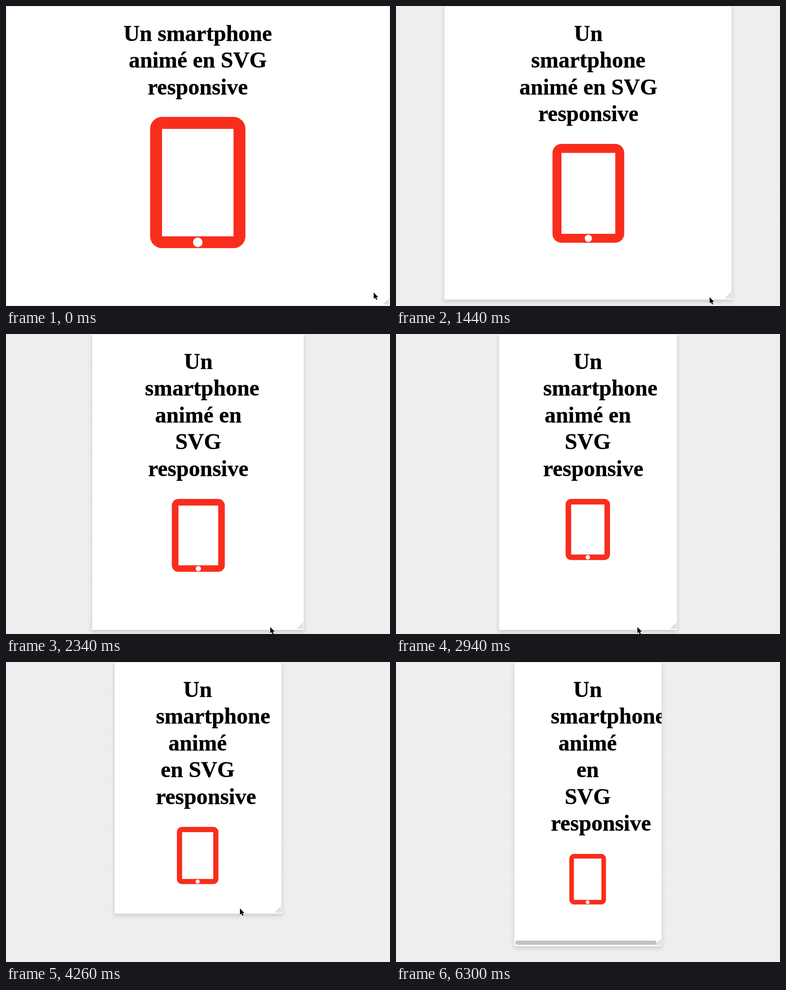
Write an HTML page that moves like this. It is 824 px wide and 644 px high and loops after 6360 ms.

```html
<!DOCTYPE html>
<html lang="fr">
<head>
<meta charset="utf-8">
<title>Un smartphone animé en SVG responsive</title>
<style>
html, body { margin: 0; width: 100%; height: 100%; overflow: hidden; background: #eee; }
svg { display: block; }
text { font: bold 48px "Liberation Serif", Times, serif; stroke: #000; stroke-width: .4px; }
#panel { filter: drop-shadow(0 4px 4px rgba(0, 0, 0, .13)); }
</style>
</head>
<body>
<svg width="824" height="644" viewBox="0 0 824 644">
  <defs>
    <pattern id="stripes" width="4" height="4" patternUnits="userSpaceOnUse">
      <rect width="4" height="4" fill="#efefef"/>
      <rect width="4" height="2" fill="#ededed"/>
    </pattern>
    <clipPath id="inside"><rect id="clip"/></clipPath>
  </defs>
  <rect width="824" height="644" fill="url(#stripes)"/>
  <rect id="panel" y=".5" fill="#fff" stroke="#dcdcdc"/>
  <g clip-path="url(#inside)">
    <g id="title"></g>
    <g id="phone">
      <rect width="100" height="137.8" rx="12.5" fill="#f92d1c"/>
      <rect x="12.5" y="12.6" width="75" height="112.8" fill="#fff"/>
      <circle cx="50" cy="131.7" r="5" fill="#fff"/>
    </g>
    <rect id="thumb" height="9" rx="4.5" fill="#c1c1c1"/>
  </g>
  <path id="grip" d="M-13 -2L-1 -14M-9 -2L-1 -10M-5 -2L-1 -6" stroke="#8a8a8a" fill="none"/>
  <path id="arrow" d="M0 0V13.6L3 10.8L5.2 15.8L7.5 14.8L5.4 10H9.6Z" stroke="#fff" stroke-linejoin="round" paint-order="stroke"/>
  <path id="sizer" d="M-7 -1H-1V-4H-3.5L0 -8L3.5 -4H1V-1H7V1H1V4H3.5L0 8L-3.5 4H-1V1H-7Z" stroke="#fff" stroke-width="2" stroke-linejoin="round" paint-order="stroke"/>
</svg>
<script>
const LOOP = 6360, STEP = 60, FULL = 823, LAG = 10;
const WORDS = "Un smartphone animé en SVG responsive".split(" ");

const $ = id => document.getElementById(id);
const set = (el, attrs) => { for (const k in attrs) el.setAttribute(k, attrs[k]); };
const move = (id, x, y) => set($(id), { transform: `translate(${x} ${y})` });
const show = (id, on) => set($(id), { visibility: on ? "visible" : "hidden" });
const clamp = (v, lo, hi) => Math.min(hi, Math.max(lo, v));

// smooth 0 to 1 between two times
function ramp(t, from, to) {
  const u = clamp((t - from) / (to - from), 0, 1);
  return u * u * (3 - 2 * u);
}

// distance of each side from the stage edge: a slowing drag, then a last nudge
function inset(t) {
  const s = clamp((t - 600) / 1000, 0, 2.6);
  return 138.2 * s - 18.8 * s * s + 21 * ramp(t, 4360, 4940);
}

function floorY(t) {
  return 643 - 18 * ramp(t, 700, 1860) + 10 * ramp(t, 1860, 2340)
    - 124 * ramp(t, 3100, 3720) + 99 * ramp(t, 3900, 4900);
}

// the pointer trails the corner, apart from its arrival and one last excursion
function pointer(t) {
  const side = inset(t);
  const arrive = 1 - ramp(t, 0, 240);
  const away = ramp(t, 5280, 5580) - ramp(t, 5760, 5880);
  return [
    FULL - 14 - 1.32 * side - 20 * arrive + 147 * away,
    floorY(t - 40) - 6 - 22 * arrive - 66 * away
  ].map(Math.round);
}

const pen = document.createElement("canvas").getContext("2d");
pen.font = 'bold 48px "Liberation Serif", Times, serif';
const measure = s => pen.measureText(s).width;

const rows = WORDS.map((_, i) => {
  const row = document.createElementNS("http://www.w3.org/2000/svg", "text");
  set(row, { y: Math.round(75 + i * 57.4) });
  return $("title").appendChild(row);
});

function wrap(width) {
  const lines = [WORDS[0]];
  for (const word of WORDS.slice(1)) {
    const last = lines.length - 1;
    const joined = lines[last] + " " + word;
    if (measure(joined) <= width) lines[last] = joined;
    else lines.push(word);
  }
  return lines;
}

function draw(time) {
  const t = Math.floor(time % LOOP / STEP) * STEP;
  const left = Math.round(inset(t)), width = FULL - 2 * left;
  const right = left + width, bottom = Math.round(floorY(t));

  set($("panel"), { x: left + .5, width, height: bottom });
  set($("clip"), { x: left + 1, y: 1, width: width - 1, height: bottom - 1 });

  // the page is laid out slightly behind its frame
  const page = FULL - 2 * inset(t - LAG);
  const box = page / 2, boxX = left + page / 4;
  const lines = wrap(box);
  rows.forEach((row, i) => {
    const s = lines[i] || "";
    row.textContent = s;
    set(row, { x: boxX + Math.max(0, (box - measure(s)) / 2) });
  });

  const size = page * .2485;
  const top = 238 + (lines.length - 3) * 58;
  set($("phone"), {
    transform: `translate(${left + (page - size) / 2} ${top}) scale(${size / 100})`
  });

  const content = page / 4 + measure("smartphone");
  show("thumb", content > width);
  set($("thumb"), { x: left + 3, y: bottom - 12, width: (width - 7) * Math.min(1, width / content) });
  move("grip", right, bottom);

  const [x, y] = pointer(t);
  const sizing = t >= 1800 && t <= 1920;
  move("arrow", x, y);
  move("sizer", x, y);
  show("sizer", sizing);
  show("arrow", !sizing && t < 5880);
}

const start = performance.now();
function tick() {
  draw(performance.now() - start);
  requestAnimationFrame(tick);
}
tick();
</script>
</body>
</html>
```
